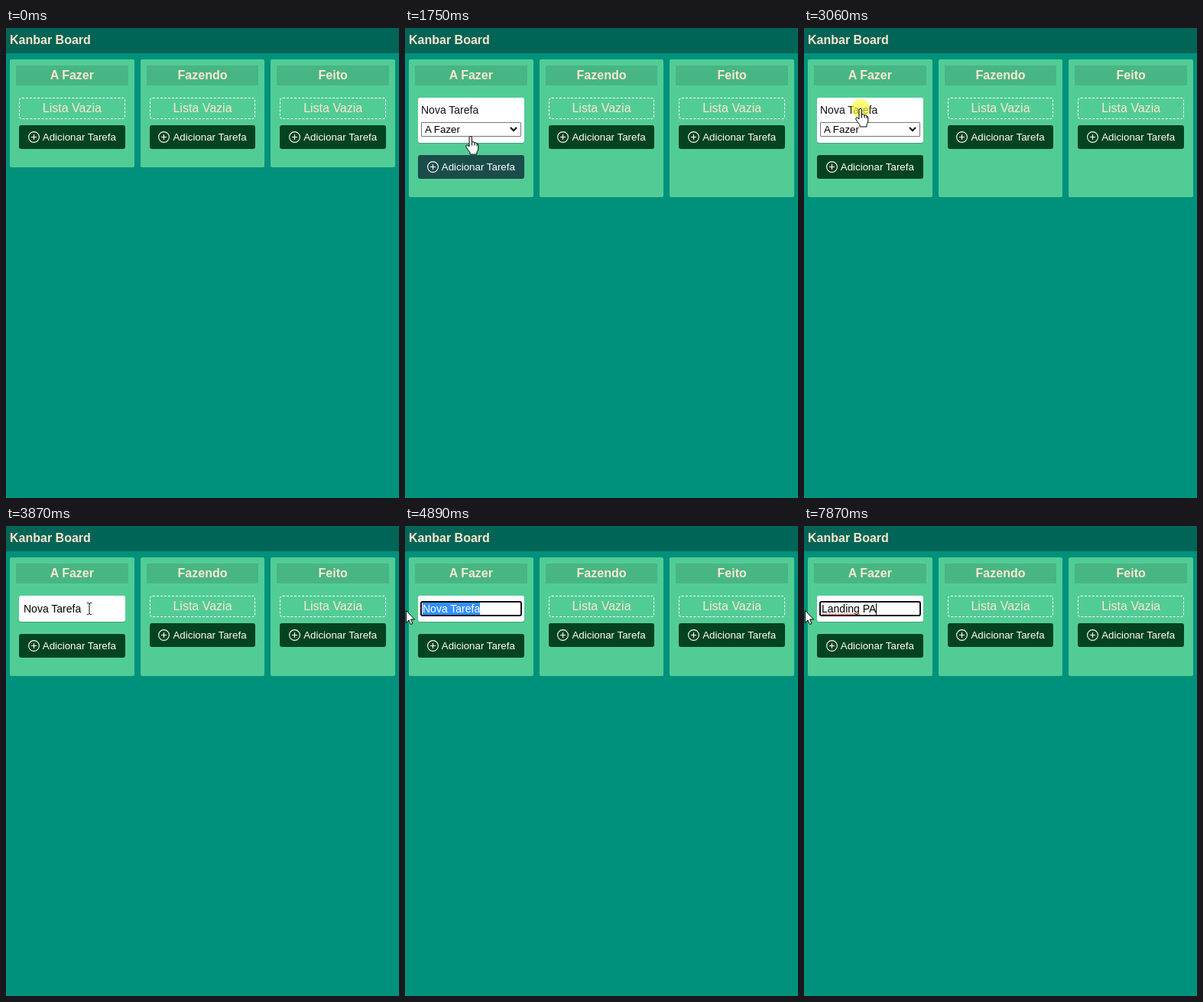
Recreate the animation shown at these times as an HTML page. Size 514 px wide and 614 px high, loop 8 s.

```html
<!DOCTYPE html>
<html lang="pt">
<head>
<meta charset="utf-8">
<title>Kanbar Board</title>
<style>
  * { box-sizing: border-box; }
  html, body { margin: 0; width: 100%; height: 100%; overflow: hidden; }
  body { position: relative; background: #00917c; color: #fde8cd; font: 16px/18px "Liberation Sans", Arial, sans-serif; }
  header { height: 33px; padding: 7px 5px; background: #006456; font-weight: bold; }
  main { display: flex; gap: 8px; padding: 8px 5px; }
  .column { flex: 1; padding: 8px 8px 24px; background: #52cc95; border-radius: 2px; }
  h2 { margin: 0 0 16px; padding: 4px; background: #48b585; font: inherit; font-weight: bold; text-align: center; }
  .empty { margin: 0 4px 8px; padding: 4px; border: 1px dashed #fff; border-radius: 4px; text-align: center; }
  .add { display: flex; align-items: center; justify-content: center; gap: 4px; height: 31px; margin: 0 4px;
    background: #04431f; border-radius: 3px; color: #fff; font-size: 13.333px; line-height: 15px; white-space: nowrap; }
  .add svg { width: 15px; height: 15px; fill: none; stroke: #fff; stroke-width: 1.1; }
  .card { position: relative; height: 59px; margin: 0 4px 16px; background: #fff; border-radius: 3px;
    box-shadow: 0 1px 1px #0003; color: #111; font-size: 14px; line-height: 16px; white-space: pre; }
  .card.editing { height: 34px; }
  .card > * { position: absolute; }
  .label { left: 4px; top: 8px; }
  .select { left: 4px; right: 4px; top: 32px; height: 19px; padding-left: 4px; border: 1px solid #767676;
    border-radius: 1px; color: #000; font-size: 13.333px; line-height: 17px; }
  .select svg { position: absolute; right: 4px; top: 5px; width: 10px; height: 7px; fill: none; stroke: #000; stroke-width: 2; }
  .ring { left: 3px; right: 3px; top: 7px; height: 20px; border: 2px solid #101010; border-radius: 3px; }
  .field, .selection { left: 6px; top: 9px; height: 16px; color: #000; }
  .selection { background: #3390ff; color: #fff; }
  .caret { display: inline-block; width: 1px; height: 15px; margin-right: -1px; background: #000; vertical-align: top; margin-top: 1px; }
  .squiggle { left: 6px; top: 23px; width: 50px; height: 3px; }
  #pointer { position: absolute; left: 0; top: 0; overflow: visible; width: 1px; height: 1px; }
  #pointer path { stroke: #000; stroke-linejoin: round; }
  [hidden], svg [hidden] { display: none !important; }
</style>
</head>
<body>
<header>Kanbar Board</header>
<main></main>
<svg id="pointer">
  <circle id="click" r="12" fill="#fffa32" fill-opacity=".65"/>
  <path id="arrow" fill="#fff" d="M.5 .5V16.5L4 13 6.5 18.5 9 17.5 6.6 12H11.5Z"/>
  <path id="hand" fill="#fff" d="M-2 14V2Q-2 .5-.3 .5T1.5 2V8Q4.5 7 5 9 7 8 8 10 9.8 10 9.8 12V17Q9.5 19.5 8 21V24H-1V21.5Q-4 18-6.3 14-6.5 11.5-4.2 12L-2 14M1.5 8V12.5M5 9V12.5M8 10V13"/>
  <path id="beam" fill="none" d="M-3-7.5H-1.5L0-6.5 1.5-7.5H3M0-6.5V6.5M-3 7.5H-1.5L0 6.5 1.5 7.5H3"/>
</svg>
<script>
const LOOP = 8000;
const TYPED = 'Landing PA';
const KEY_TIMES = [5420, 5750, 5880, 6280, 6420, 6480, 6620, 7220, 7740, 7870];
// Pointer stops: time, x, y
const PATH = [
  [540, 326, 563], [720, 242, 350], [900, 155, 180], [1050, 116, 140], [1090, 113.5, 138],
  [1150, 113, 138], [1290, 98, 138], [1420, 86, 141], [1830, 86, 141], [2100, 79, 122],
  [2270, 79, 122], [2440, 75, 118], [2570, 75, 118], [2640, 69, 108], [2710, 74, 105],
  [3190, 74, 105], [3730, 106, 113], [3800, 107, 110], [3870, 109, 108], [4070, 109, 108],
  [4300, 88, 106], [4600, 32, 108], [4820, 2, 111], [4890, 1, 110]
];

const column = title => `<section class="column">
  <h2>${title}</h2>
  <div class="empty">Lista Vazia</div>
  <div class="add"><svg viewBox="0 0 15 15"><circle cx="7.5" cy="7.5" r="6.9"/><path d="M7.5 4V11M4 7.5H11"/></svg>Adicionar Tarefa</div>
</section>`;
const card = `<div class="card"><span class="label">Nova Tarefa</span>` +
  `<div class="select">A Fazer<svg viewBox="0 0 10 7"><path d="M1 1L5 5 9 1"/></svg></div>` +
  `<div class="ring"></div><span class="field"><span class="value"></span><i class="caret"></i></span>` +
  `<span class="selection">Nova Tarefa</span>` +
  `<svg class="squiggle"><pattern id="wave" width="4" height="3" patternUnits="userSpaceOnUse">` +
  `<path d="M0 2.5L2 .5 4 2.5" fill="none" stroke="#f22"/></pattern><rect width="50" height="3" fill="url(#wave)"/></svg></div>`;

const $ = selector => document.querySelector(selector);
$('main').innerHTML = ['A Fazer', 'Fazendo', 'Feito'].map(column).join('');
$('.empty').insertAdjacentHTML('afterend', card);

const parts = Object.fromEntries(
  ['.empty', '.card', '.label', '.select', '.ring', '.field', '.value', '.caret', '.selection', '.squiggle',
    '.add', '#pointer', '#click', '#arrow', '#hand', '#beam'].map(s => [s.slice(1), $(s)]));
const show = (name, visible) => parts[name].toggleAttribute('hidden', !visible);
const clamp = (v, low, high) => Math.min(high, Math.max(low, v));
const ramp = (t, from, to) => clamp((t - from) / (to - from), 0, 1);

function pointerAt(t) {
  const next = PATH.findIndex(stop => stop[0] > t);
  if (next < 1) return (next ? PATH.at(-1) : PATH[0]).slice(1);
  const [a, b] = [PATH[next - 1], PATH[next]];
  const k = ramp(t, a[0], b[0]);
  return [1, 2].map(i => a[i] + (b[i] - a[i]) * k);
}

function render(t) {
  const within = (from, to = LOOP) => t >= from && t < to;
  const [x, y] = pointerAt(t);
  const editing = within(3190), dragging = within(4070, 4890), typing = within(5420);

  show('empty', t < 1690);
  show('card', within(1690));
  parts.card.classList.toggle('editing', editing);
  show('label', !editing);
  show('select', !editing);
  parts.select.style.borderColor = within(1830, 2370) ? '#4f4f4f' : '#767676';

  const hover = ramp(t, 950, 1290) - ramp(t, 1830, 2100);
  parts.add.style.background = `color-mix(in srgb, #1a4d4a ${hover * 100}%, #04431f)`;

  show('field', editing);
  show('ring', within(4070));
  parts.value.textContent = typing ? TYPED.slice(0, KEY_TIMES.filter(k => k <= t).length) : 'Nova Tarefa';
  show('caret', typing && !within(7150, 7220));
  show('squiggle', within(7350));
  show('selection', within(4070, 5420));
  const unselected = clamp(Math.round((x - 23) / 6.85) * 6.85, 0, 76);
  parts.selection.style.clipPath = `inset(0 0 0 ${unselected}px)`;

  const onButton = within(930, 3190);
  show('pointer', within(540));
  show('hand', onButton);
  show('beam', within(3190, 4890));
  show('arrow', within(540, 930) || within(4890));
  show('click', within(1620, 1690) || within(2930, 3190) || dragging);
  const snap = v => Math.round(v * 2) / 2;
  parts.pointer.style.transform = `translate(${snap(x)}px, ${snap(y)}px)`;
}

function frame(now) {
  render(now % LOOP);
  requestAnimationFrame(frame);
}
render(0);
requestAnimationFrame(frame);
</script>
</body>
</html>
```
